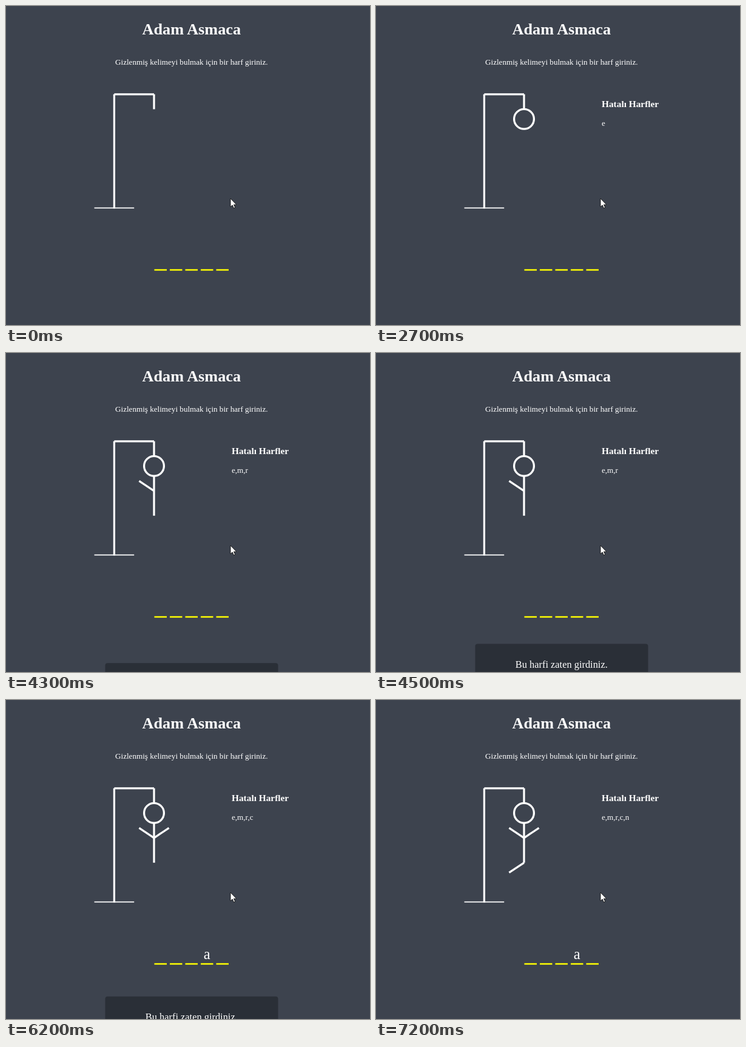
Write an HTML page that moves like this. It is 600 px wide and 527 px high and loops after 8000 ms.

```html
<!DOCTYPE html>
<html lang="tr">
<head>
<meta charset="utf-8">
<title>Adam Asmaca</title>
<style>
  html, body { margin: 0; width: 100%; height: 100%; overflow: hidden; background: #3d434e; }
  svg { display: block; width: 600px; height: 527px; }
  text { font-family: "Liberation Serif", "Times New Roman", serif; font-size: 13.12px; fill: #fff; }
  .mid { text-anchor: middle; }
  .man { fill: none; stroke: #fff; stroke-width: 4; }
</style>
</head>
<body>
<svg viewBox="0 0 600 527">
  <text class="mid" x="305.8" y="47" style="font-size:26.24px;font-weight:bold">Adam Asmaca</text>
  <text class="mid" x="305.8" y="96.5">Gizlenmiş kelimeyi bulmak için bir harf giriniz.</text>

  <g class="man" transform="translate(129.2 129.4) scale(.82)">
    <path d="M60 20H140M140 20V50M60 20V250"/>
    <path d="M20 249H100" stroke-width="2"/>
    <circle class="part" cx="140" cy="70" r="20"/>
    <path class="part" d="M140 90V170"/>
    <path class="part" d="M140 120L110 100"/>
    <path class="part" d="M140 120L170 100"/>
    <path class="part" d="M140 170L110 190"/>
  </g>

  <g id="wrong">
    <text x="372" y="167" style="font-size:15.35px;font-weight:bold">Hatalı Harfler</text>
    <text id="letters" x="372" y="198"></text>
  </g>

  <path d="M244.5 436h123" stroke="#ff0" stroke-width="2.5" stroke-dasharray="20.5 5"/>
  <text id="found" class="mid" x="331.3" y="428" style="font-size:24.6px">a</text>

  <g id="popup">
    <rect x="163.5" y="480.5" width="285" height="70" rx="4" fill="#2a2f37"/>
    <text class="mid" x="305.8" y="520" style="font-size:16.4px">Bu harfi zaten girdiniz.</text>
  </g>

  <path d="M370 318v14l3.2-3 2.3 5 2.2-1-2.2-4.8h4.3z" fill="#fff" stroke="#111" stroke-width=".9"/>
</svg>
<script>
const LOOP = 8000, STEP = 100;
const misses = [[2700, "e"], [2900, "m"], [3200, "r"], [5400, "c"], [7200, "n"]];
const FOUND = 6000, SHOW = 4130, HIDE = 6130, SLIDE = 300, TRAVEL = 82;

const $ = id => document.getElementById(id);
const parts = document.querySelectorAll(".part");
const show = (el, on) => el.setAttribute("visibility", on ? "visible" : "hidden");

// CSS ease-in-out: cubic-bezier(.42, 0, .58, 1)
function ease(x) {
  if (x <= 0) return 0;
  if (x >= 1) return 1;
  let lo = 0, hi = 1;
  for (let i = 0; i < 20; i++) {
    const u = (lo + hi) / 2, v = 1 - u;
    if (1.26 * v * v * u + 1.74 * v * u * u + u ** 3 < x) lo = u; else hi = u;
  }
  return lo * lo * (3 - 2 * lo);
}

function draw(now) {
  const t = Math.floor(now % LOOP / STEP) * STEP;
  const made = misses.filter(([at]) => t >= at);
  parts.forEach((part, i) => show(part, i < made.length));
  show($("wrong"), made.length > 0);
  $("letters").textContent = made.map(([, letter]) => letter).join(",");
  show($("found"), t >= FOUND);
  const shown = ease((t - SHOW) / SLIDE) - ease((t - HIDE) / SLIDE);
  $("popup").setAttribute("transform", `translate(0 ${TRAVEL * (1 - shown)})`);
}

let start;
function frame(now) {
  start ??= now;
  draw(now - start);
  requestAnimationFrame(frame);
}
draw(0);
requestAnimationFrame(frame);
</script>
</body>
</html>
```
